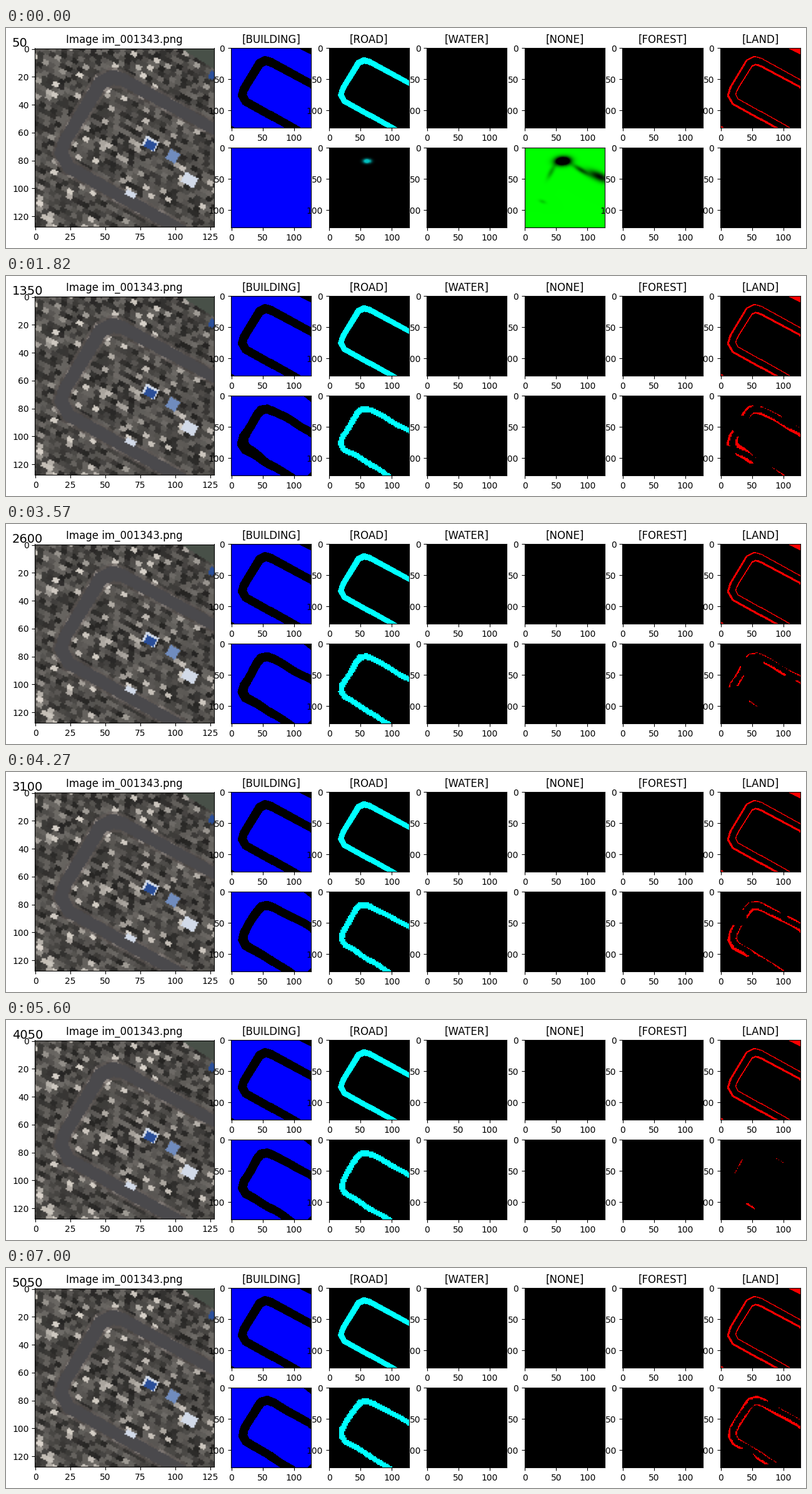
A matplotlib script that plays this animation: 1280 px wide and 353 px high, repeating every 7070 ms.

```python
import numpy as np
import matplotlib.pyplot as plt
from matplotlib.animation import FuncAnimation

W, H, N = 1280, 353, 128
FRAMES, INTERVAL = 101, 70
LABELS = ["BUILDING", "ROAD", "WATER", "NONE", "FOREST", "LAND"]
BLUE, CYAN, GREEN, RED, WHITE = (
    255 * np.array(c) for c in [(0, 0, 1), (0, 1, 1), (0, 1, 0), (1, 0, 0), (1, 1, 1)]
)

Y, X = np.mgrid[0:N, 0:N].astype(float)
X2, Y2 = X[::2, ::2] + 0.5, Y[::2, ::2] + 0.5   # the road is predicted at half size

# centre line of the road: x, y, half width
ROAD = np.array([(132, 60, 4), (62, 22, 4.6), (55, 20.5, 5.3), (46.5, 24.5, 5),
                 (20.5, 67, 4.4), (18.5, 75, 4.7), (24, 85, 4.5), (106, 131, 4.2)])
# the gap between buildings is wider and sits slightly down and left
GAP = ROAD + (-1, 0.5, 2.3)

plt.rcParams.update({"font.family": "DejaVu Sans", "font.size": 10})
fig = plt.figure(figsize=(W / 100, H / 100), dpi=100, facecolor="white")


# ---------- shapes on the pixel grid ----------
def band(nodes, x=X, y=Y):
    """Inside depth of a polyline whose nodes are (x, y, half width)."""
    best = np.full(x.shape, -1e3)
    for (x0, y0, r0), (x1, y1, r1) in zip(nodes, nodes[1:]):
        dx, dy = x1 - x0, y1 - y0
        t = np.clip(((x - x0) * dx + (y - y0) * dy) / (dx * dx + dy * dy + 1e-9), 0, 1)
        best = np.maximum(best, r0 + (r1 - r0) * t - np.hypot(x - x0 - t * dx, y - y0 - t * dy))
    return best


def turned(cx, cy, deg):
    a = np.radians(deg)
    return ((X - cx) * np.cos(a) + (Y - cy) * np.sin(a),
            (Y - cy) * np.cos(a) - (X - cx) * np.sin(a))


def blob(cx, cy, sx, sy, deg=0):
    u, v = turned(cx, cy, deg)
    return np.exp(-(u / sx) ** 2 - (v / sy) ** 2)


def resample(nodes, count=26):
    s = np.r_[0, np.cumsum(np.hypot(*np.diff(nodes[:, :2], axis=0).T))]
    at = np.linspace(0, s[-1], count)
    return np.column_stack([np.interp(at, s, col) for col in nodes.T])


def tint(mask, color):
    return (np.clip(mask, 0, 1)[..., None] * color).astype(np.uint8)


# ---------- ground truth ----------
def truth():
    corners = (X > 104 + 2 * Y) | (Y > 124 + 0.6 * X)
    building = (band(GAP) < 0) & ~corners
    road = band(ROAD) > 0
    return building, road, ~building & ~road


# ---------- aerial view, simplified to flat tones ----------
def aerial():
    rng = np.random.default_rng(7)
    u, v = turned(0, 0, 28)
    row = ((v + 70) // 3.5).astype(int)
    col = ((u + 3 * (row % 3)) // 4.5).astype(int)
    shade = 36 + 72 * rng.random((60, 60)) + 105 * (rng.random((60, 60)) > 0.91)
    img = shade[row, col][..., None] * np.array([1.03, 1, 0.96])
    img[X > 104 + 1.6 * Y] = (72, 80, 72)

    depth = band(ROAD)
    img[depth > -2] = 0.4 * img[depth > -2] + 0.6 * np.array([98, 91, 88])
    img[depth > 0] = (74, 73, 76)

    def roof(x, y, w, h, color):
        u, v = turned(x, y, 28)
        img[(abs(u) < w) & (abs(v) < h)] = color

    pale, blue = (210, 218, 232), (42, 78, 152)
    roof(82, 68, 5, 4, pale)
    roof(82, 69, 4, 3, blue)
    roof(98, 77, 4, 4, (112, 140, 190))
    roof(110, 94, 5, 4, pale)
    roof(68, 104, 4, 2, pale)
    roof(126, 19, 2, 3, blue)
    return img.clip(0, 255).astype(np.uint8)


# ---------- predictions: the truth, bent by a wobble that calms down ----------
rng = np.random.default_rng(3)
PHASE = rng.uniform(0, 2 * np.pi, (2, 3))
SPEED = rng.uniform(0.2, 0.7, (2, 3))
ROAD_PATH, GAP_PATH = resample(ROAD), resample(GAP)


def bend(path, i, kind):
    x, y, r = path.T
    s = np.linspace(0, 1, len(path))
    amp = 0.4 + 0.5 * np.exp(-i / 25)
    wave = amp * sum(np.sin(2 * np.pi * f * s + SPEED[kind, k] * i + PHASE[kind, k])
                     for k, f in enumerate((2, 3, 5)))
    dx, dy = np.gradient(x), np.gradient(y)
    norm = np.hypot(dx, dy)
    drift = 7 * np.maximum(0, (y - 95) / 30)   # the lower end is always guessed too far left
    return np.column_stack([x - wave * dy / norm - drift, y + wave * dx / norm, r])


def predict(i):
    opened = np.sqrt(min(1, i / 8))
    road, gap = bend(ROAD_PATH, i, 0), bend(GAP_PATH, i, 1)
    gap[:, 2] += 6 * np.exp(-i / 30 - ((gap[:, 1] - 82) / 16) ** 2)   # early swelling at the bend
    for path in road, gap:
        path[:, 2] = -2 + (path[:, 2] + 2) * opened

    gap_depth = band(gap)
    corner = (X > 128 - 15 * opened + 1.25 * Y) | (X + Y > 255 - 7 * opened)
    ways = np.kron(band(road, X2, Y2) > 0, np.ones((2, 2)))

    # land fills the strip between gap and road in drifting patches
    amount = np.cos(2 * np.pi * (i - 60) / 40)
    patch = (np.sin(0.09 * X + 0.05 * Y + 0.21 * i) + np.sin(0.1 * Y - 0.06 * X - 0.17 * i)
             - np.maximum(0, (Y - 95) / 20))
    land = (gap_depth > 0.6 - 0.6 * amount) & (ways == 0) & (patch > -0.2 - 0.7 * amount)

    ways = np.maximum(ways, FIRST_SPOT * max(0, 1 - i / 3))
    return {0: tint(~((gap_depth > 0) | corner), BLUE),
            1: tint(ways, CYAN),
            3: tint((1 - NONE_DARK) * max(0, 1 - i / 5), GREEN),
            4: tint(FOREST_SPOTS * max(0, 1 - abs(i - 12) / 7), WHITE),
            5: tint(land, RED)}


NONE_DARK = np.clip(1.9 * blob(60, 22, 12, 7, -4) + 0.35 * blob(42, 39, 4, 12, 28)
                    + 0.6 * blob(88, 36, 14, 4, 32) + 0.95 * blob(118, 47, 20, 7, 24)
                    + 0.18 * blob(28, 86, 6, 3, 20), 0, 1)
FIRST_SPOT = 0.75 * np.clip(1.4 * blob(60, 22, 6, 3.6), 0, 1)
FOREST_SPOTS = 0.14 * (blob(47, 36, 3, 2) + blob(59, 82, 4, 4) + blob(121, 3, 3, 3))


# ---------- layout ----------
def panel(left, top, size, xticks, yticks, title=None):
    ax = fig.add_axes([left / W, 1 - (top + size) / H, size / W, size / H], facecolor="black")
    ax.set(xlim=(-0.5, N - 0.5), ylim=(N - 0.5, -0.5), xticks=xticks, yticks=yticks)
    if title:
        ax.set_title(title, fontsize=12, y=1.0)
    return ax


def small(j, top, title=None):
    return panel(360 + 156.6 * j, top, 128.2, [0, 50, 100], [0, 50, 100], title)


def show(ax, img, **kw):
    return ax.imshow(img, aspect="auto", extent=(-0.5, N - 0.5, N - 0.5, -0.5), **kw)


photo = panel(46.1, 32.5, 286.4, range(0, 126, 25), range(0, 121, 20), "Image im_001343.png")
show(photo, aerial())

upper = [small(j, 31.7, f"[{name}]") for j, name in enumerate(LABELS)]
lower = [small(j, 191.7) for j in range(6)]

for j, mask, color in zip((0, 1, 5), truth(), (BLUE, CYAN, RED)):
    show(upper[j], tint(mask, color), interpolation="nearest")
views = {j: show(lower[j], img, interpolation="nearest") for j, img in predict(0).items()}
step = fig.text(9.7 / W, 1 - 29.7 / H, "50", fontsize=14, va="baseline")


def update(i):
    for j, img in predict(i).items():
        views[j].set_data(img)
    step.set_text(str(50 * (i + 1)))
    return [*views.values(), step]


anim = FuncAnimation(fig, update, frames=FRAMES, interval=INTERVAL, repeat=True, repeat_delay=0, blit=False)
plt.show()
```
